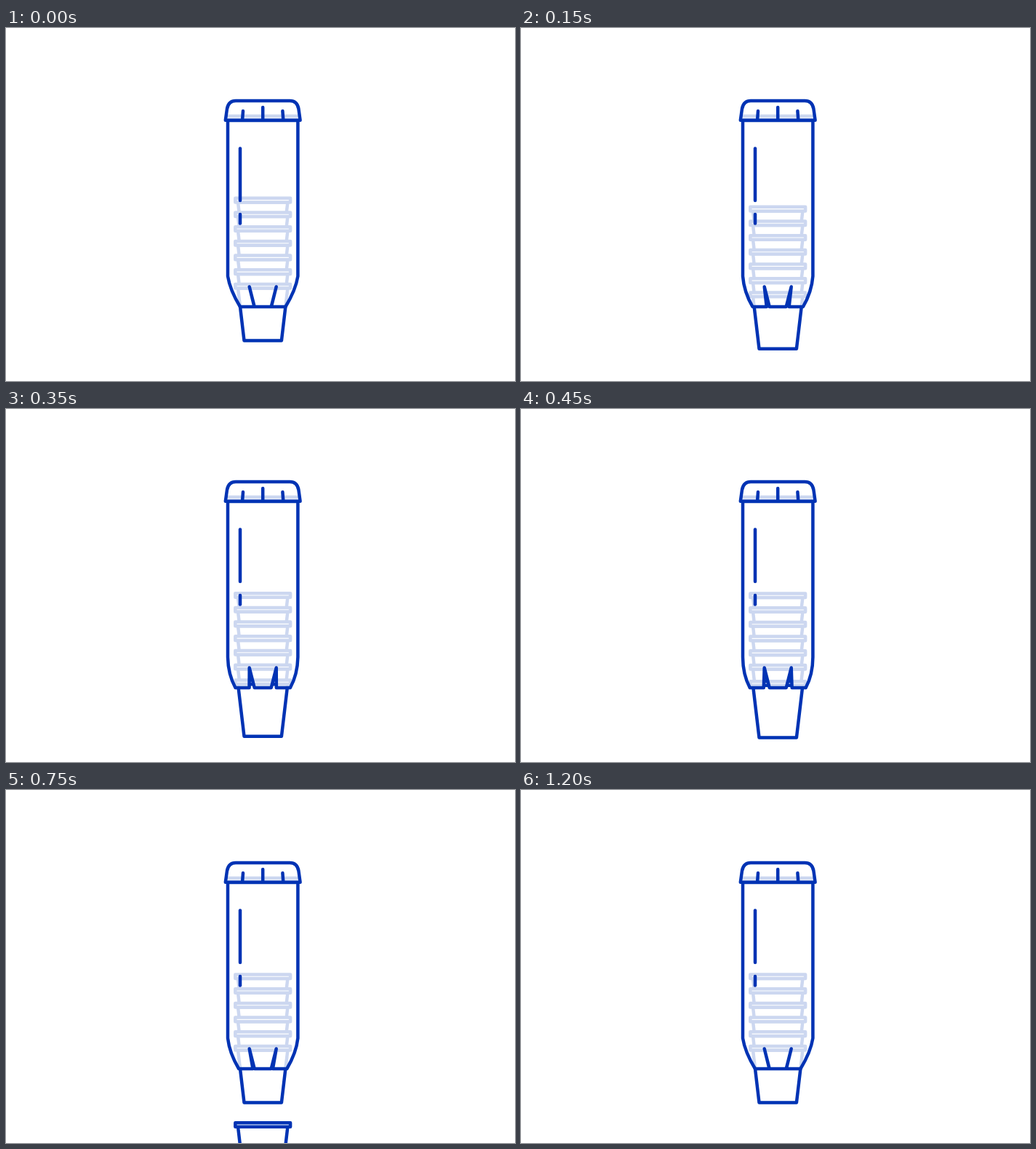
An HTML page with a canvas for the animation above (1.5 s loop, 700 by 485 pixels).

```html
<!DOCTYPE html>
<html lang="en">
<head>
<meta charset="utf-8">
<title>Cup dispenser</title>
<style>
  html, body { margin: 0; height: 100%; overflow: hidden; background: #fff; }
  canvas { display: block; }
</style>
</head>
<body>
<canvas id="stage" width="700" height="485"></canvas>
<script>
const ctx = document.getElementById('stage').getContext('2d');
const LOOP = 1500, STEP = 50, LAST = 1200;
const BLUE = '#0033b4', PALE = '#ccd7f0';
const TOP = 233.8, PITCH = 19.7, CUPS = 7;
const mirror = x => 706.4 - x;

const progress = (t, start, length) => Math.min(1, Math.max(0, (t - start) / length));
const easeOut = (p, power = 2) => 1 - (1 - p) ** power;

function paint(path, color, fill) {
  if (fill) {
    ctx.fillStyle = fill;
    ctx.fill(path);
  }
  ctx.strokeStyle = color;
  ctx.stroke(path);
}

const line = (color, ...points) => paint(new Path2D('M' + points.join(' ')), color);

function drawCup(y, color) {
  const bottom = y + 77.4;
  paint(new Path2D(`M319 ${y + 5.6}L327.5 ${bottom}H${mirror(327.5)}L${mirror(319)} ${y + 5.6}Z`), color, '#fff');
  paint(new Path2D(`M315.3 ${y}H${mirror(315.3)}v5.6H315.3Z`), color, '#fff');
}

// Tube whose two outer flaps swing outwards as `open` goes from 0 to 1.
function tubePath(open) {
  const outer = 322 - 7.5 * open, inner = 341.5 - 8 * open;
  const bendX = 308 - 3 * open, bendY = 360 + 5 * open;
  return new Path2D(`M305 127V341Q${bendX} ${bendY} ${outer} 383H${inner}L334.7 355.5L341.7 383
    H${mirror(341.7)}L${mirror(334.7)} 355.5L${mirror(inner)} 383H${mirror(outer)}
    Q${mirror(bendX)} ${bendY} ${mirror(305)} 341V127Z`);
}

function drawCap() {
  line(PALE, 305, 121, 401.4, 121);
  paint(new Path2D('M301.8 126.7L304 111Q306 100 316 100H390.4Q400.4 100 402.4 111L404.6 126.7Z'), BLUE);
  line(BLUE, 326, 114, 325.2, 125);
  line(BLUE, 353.2, 109, 353.2, 125);
  line(BLUE, mirror(326), 114, mirror(325.2), 125);
}

function draw(t) {
  const stackShift = PITCH * easeOut(progress(t, 0, 400));
  const cupShift = 22.4 * easeOut(progress(t, 0, 500)) + 100 * easeOut(progress(t, 550, 450), 3);
  const open = easeOut(progress(t, 0, 550)) - easeOut(progress(t, 550, 400));
  const cupY = i => TOP + PITCH * i + (i === CUPS - 1 ? cupShift : stackShift);
  const tube = tubePath(open);

  ctx.fillStyle = '#fff';
  ctx.fillRect(0, 0, 700, 485);
  ctx.lineWidth = 4.5;
  ctx.lineCap = ctx.lineJoin = 'round';

  drawCup(cupY(CUPS - 2), BLUE);
  ctx.globalAlpha = 1 - progress(t, 850, 350);
  drawCup(cupY(CUPS - 1), BLUE);
  ctx.globalAlpha = 1;

  ctx.save();
  ctx.clip(tube);
  ctx.fillStyle = '#fff';
  ctx.fill(tube);
  for (let i = 0; i < CUPS; i++) {
    if (cupY(i) < 383) drawCup(cupY(i), PALE);
  }
  ctx.restore();

  paint(tube, BLUE);
  line(BLUE, 322, 165.5, 322, 237);
  line(BLUE, 322, 256, 322, 268.5);
  drawCap();
}

function tick() {
  const t = performance.now() % LOOP;
  draw(Math.min(LAST, Math.floor(t / STEP) * STEP));
  requestAnimationFrame(tick);
}
tick();
</script>
</body>
</html>
```
